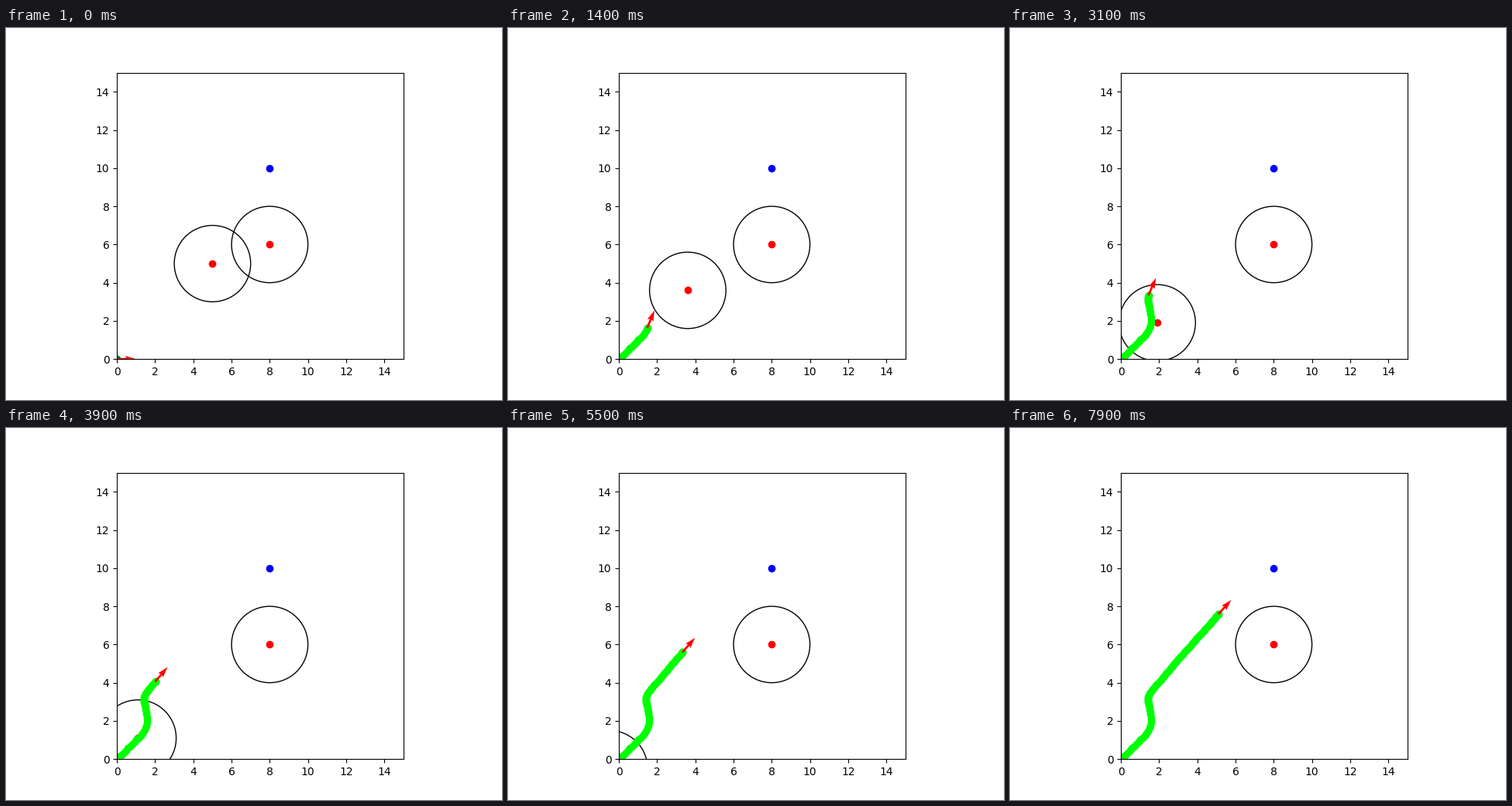
Recreate the animation shown at these times as a matplotlib script. Size 640 px wide and 480 px high, loop 8 s.

```python
import numpy as np
import matplotlib.pyplot as plt
from matplotlib.animation import FuncAnimation

FRAMES, STEP_MS = 80, 100
GOAL, STILL, MOVING = (8, 10), (8, 6), (5, 5)
RADIUS = 2


def ease(t, start, end):
    u = np.clip((t - start) / (end - start), 0, 1)
    return u * u * (3 - 2 * u)


def course(t):
    """Direction of travel: swerve left of the obstacle, then back."""
    swerve = 57 * ease(t, 8.5, 21) - 51.5 * ease(t, 26, 34)
    drift = 0.05 * np.maximum(t - 34, 0)
    return np.radians(44.5 + swerve - drift)


def speed(t):
    """Slow decay with a dip while the robot turns back."""
    return 0.163 - 0.00077 * t - 0.09 * np.exp(-((t - 27.5) / 4) ** 2 / 2)


steps = np.arange(FRAMES)
mid = steps[:-1] + 0.5
xs = np.append(0, np.cumsum(speed(mid) * np.cos(course(mid))))
ys = np.append(0, np.cumsum(speed(mid) * np.sin(course(mid))))
# The arrow starts level and catches up with the course.
heading = course(steps) - course(0) * np.exp(-steps / 3)

fig, ax = plt.subplots(figsize=(6.4, 4.8), dpi=100)
ax.set_aspect("equal")


def add_obstacle(pos):
    ring = ax.add_patch(plt.Circle(pos, RADIUS, fill=False))
    dot, = ax.plot(*pos, "ro")
    return ring, dot


add_obstacle(STILL)
ring, dot = add_obstacle(MOVING)
ax.plot(*GOAL, "bo")
robot, = ax.plot(0, 0, "go")
trail, = ax.plot([], [], "o", color="lime")
arrow = ax.quiver(0, 0, 1, 0, color="red", scale_units="xy", scale=1,
                  zorder=2.2)
ax.set(xlim=(0, 15), ylim=(0, 15))


def update(n):
    pos = tuple(c - 0.1 * n for c in MOVING)
    ring.center = pos
    dot.set_data([pos[0]], [pos[1]])
    robot.set_data([xs[n]], [ys[n]])
    end = n + 1 if n else 0
    trail.set_data(xs[:end], ys[:end])
    arrow.set_offsets([(xs[n], ys[n])])
    arrow.set_UVC(np.cos(heading[n]), np.sin(heading[n]))
    return ring, dot, robot, trail, arrow


anim = FuncAnimation(fig, update, frames=FRAMES, interval=STEP_MS,
                     repeat=True, repeat_delay=0)
plt.show()
```
